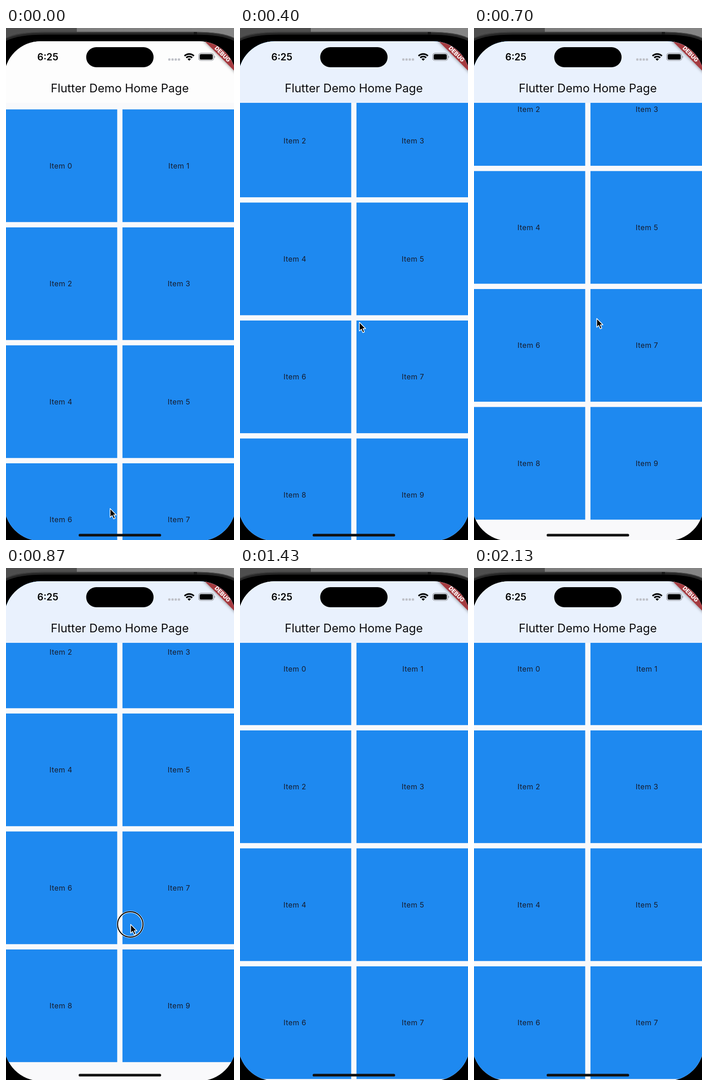
An HTML page for the animation above (2160 ms loop, 499x1122 px).

```html
<!DOCTYPE html>
<html lang="en">
<head>
<meta charset="utf-8">
<title>Scrolling grid</title>
<style>
  html, body { margin: 0; width: 100%; height: 100%; overflow: hidden; background: #000; }
  svg { display: block; width: 100%; height: 100%; }
  text { font-family: Inter, "Noto Sans", sans-serif; text-anchor: middle; }
  .label { font-size: 16px; letter-spacing: .4px; fill: #161b2b; }
</style>
</head>
<body>
<svg viewBox="0 0 499 1122" xmlns="http://www.w3.org/2000/svg">
  <defs>
    <clipPath id="screen"><rect x="-4" y="29" width="507" height="1095" rx="80"/></clipPath>
    <linearGradient id="desk">
      <stop offset="0" stop-color="#7c7c7c"/><stop offset="1" stop-color="#858585"/>
    </linearGradient>
    <filter id="soft" x="-20%" y="-100%" width="140%" height="300%">
      <feDropShadow dx="0" dy="0" stdDeviation="3.5" flood-opacity=".5"/>
    </filter>
  </defs>

  <!-- desktop and phone frame -->
  <rect width="499" height="30" fill="url(#desk)"/>
  <rect width="155" height="30" fill="#4e4e4e"/>
  <path d="M-5 24C15 13 45 8.5 85 8.5H414C454 8.5 484 13 504 24V1130H-5Z" fill="#262626"/>
  <path d="M-5 25C15 14 45 9.5 85 9.5H414C454 9.5 484 14 504 25" fill="none" stroke="#444" stroke-width="1.5"/>
  <path d="M-5 31C15 19 45 14.5 85 14.5H414C454 14.5 484 19 504 31V1130H-5Z" fill="#000"/>
  <rect x="411" y="9" width="7" height="5.5" fill="#161616"/>

  <g clip-path="url(#screen)">
    <rect x="-4" y="29" width="507" height="1097" fill="#f9f9fb"/>
    <g id="grid"></g>
    <rect id="bar" x="-4" y="29" width="507" height="135"/>
    <text x="249" y="140.5" font-size="25.5" fill="#0c0c0e">Flutter Demo Home Page</text>
    <rect x="159" y="1108.6" width="180.5" height="5.7" rx="2.85" fill="#111"/>
    <g transform="translate(474 57) rotate(45)">
      <rect x="-70" y="-8" width="140" height="16" fill="#a53a3f" filter="url(#soft)"/>
      <text y="4.4" font-size="12.4" font-weight="800" fill="#fff">DEBUG</text>
    </g>
  </g>

  <!-- status bar -->
  <text x="91.5" y="71.3" font-size="21" font-weight="600">6:25</text>
  <rect x="175.5" y="42" width="147.5" height="44" rx="22"/>
  <g fill="#bfc1c8">
    <rect x="355" y="66.5" width="5" height="5" rx="1.6"/>
    <rect x="362" y="66.5" width="5" height="5" rx="1.6"/>
    <rect x="369" y="66.5" width="5" height="5" rx="1.6"/>
    <rect x="376" y="66.5" width="5" height="5" rx="1.6"/>
  </g>
  <g fill="none" stroke="#000" stroke-width="3.4">
    <path d="M390.7 61.2A14.6 14.6 0 0 1 411.3 61.2"/>
    <path d="M394.6 65.2A9 9 0 0 1 407.4 65.2"/>
  </g>
  <path d="M401 71.7L397.3 68A5.3 5.3 0 0 1 404.7 68Z"/>
  <rect x="421.7" y="55.2" width="33" height="16.2" rx="5.2" fill="none" stroke="#9a9ca2" stroke-width="1.4"/>
  <rect x="423.8" y="57.3" width="28.8" height="12" rx="3.4"/>
  <path d="M456 60.7q1.8 .7 1.8 2.6t-1.8 2.6Z" fill="#9a9ca2"/>

  <g id="pointer">
    <g id="ring" fill="none">
      <circle r="27.6" stroke="#fff" stroke-width="4.4"/>
      <circle r="27.8" stroke="#000" stroke-width="2.2"/>
    </g>
    <path d="M.8 0V19.2L5.2 15.2L8.5 22.8L11.9 21.3L8.7 13.9H14.4Z" stroke="#fff" stroke-width="1.5" stroke-linejoin="round"/>
  </g>
</svg>
<script>
const LOOP = 2160, STEP = 10, TOP = 178.4, TILE = 246.9, PITCH = 258.5;
const $ = id => document.getElementById(id);
const clamp = v => Math.max(0, Math.min(1, v));
const show = (id, on) => $(id).setAttribute('display', on ? 'inline' : 'none');

$('grid').innerHTML = Array.from({ length: 10 }, (_, i) => {
  const x = i % 2 ? 254.9 : -3.5, y = TOP + (i >> 1) * PITCH;
  return `<rect x="${x}" y="${y}" width="${TILE}" height="${TILE}" fill="#1e89f0"/>
    <text class="label" x="${x + TILE / 2 + .2}" y="${y + 129.4}">Item ${i}</text>`;
}).join('');

// Monotone cubic curve through [time, value] points.
function track(pts) {
  const slope = pts.slice(1).map((p, i) => (p[1] - pts[i][1]) / (p[0] - pts[i][0]));
  const tan = pts.map((_, i) => {
    const a = slope[i - 1], b = slope[i];
    return a === undefined || b === undefined ? a ?? b : a * b > 0 ? 2 * a * b / (a + b) : 0;
  });
  return t => {
    if (t <= pts[0][0]) return pts[0][1];
    const k = pts.findIndex(p => p[0] > t);
    if (k < 0) return pts[pts.length - 1][1];
    const [t0, v0] = pts[k - 1], [t1, v1] = pts[k], h = t1 - t0, u = (t - t0) / h;
    return v0 + (v1 - v0) * u * u * (3 - 2 * u)
      + h * u * (1 - u) * ((1 - u) * tan[k - 1] - u * tan[k]);
  };
}

// Fling up past the end, spring back, then drag down part of the way.
const scroll = track([[0, 0], [140, 0], [270, 120.5], [450, 365], [530, 399.5], [600, 399.5],
  [660, 388], [760, 376.5], [870, 376.5], [980, 217], [1095, 81], [LOOP, 81]]);
const pointX = track([[0, 227], [270, 249], [530, 267], [600, 267], [870, 272],
  [1000, 290], [1170, 335], [1220, 380], [1300, 510]]);
const pointY = track([[0, 1053], [140, 865], [270, 731], [530, 602], [600, 602], [870, 781],
  [980, 935], [1160, 784], [1200, 784], [1300, 800]]);

const plain = [253, 253, 253], tinted = [233, 241, 253];

function draw(t) {
  $('grid').setAttribute('transform', `translate(0 ${-scroll(t).toFixed(2)})`);
  const k = clamp((t - 145) / 100);
  $('bar').setAttribute('fill', `rgb(${plain.map((c, i) => Math.round(c + (tinted[i] - c) * k))})`);
  $('pointer').setAttribute('transform', `translate(${pointX(t).toFixed(2)} ${pointY(t).toFixed(2)})`);
  show('ring', (t > 140 && t < 250) || (t > 850 && t < 990));
  show('pointer', t < 1300);
}

// The recording's clock ticks in hundredths of a second.
const start = performance.now();
function tick() {
  const t = (performance.now() - start) % LOOP;
  draw(Math.floor(t / STEP) * STEP);
  requestAnimationFrame(tick);
}
draw(0);
requestAnimationFrame(tick);
</script>
</body>
</html>
```
